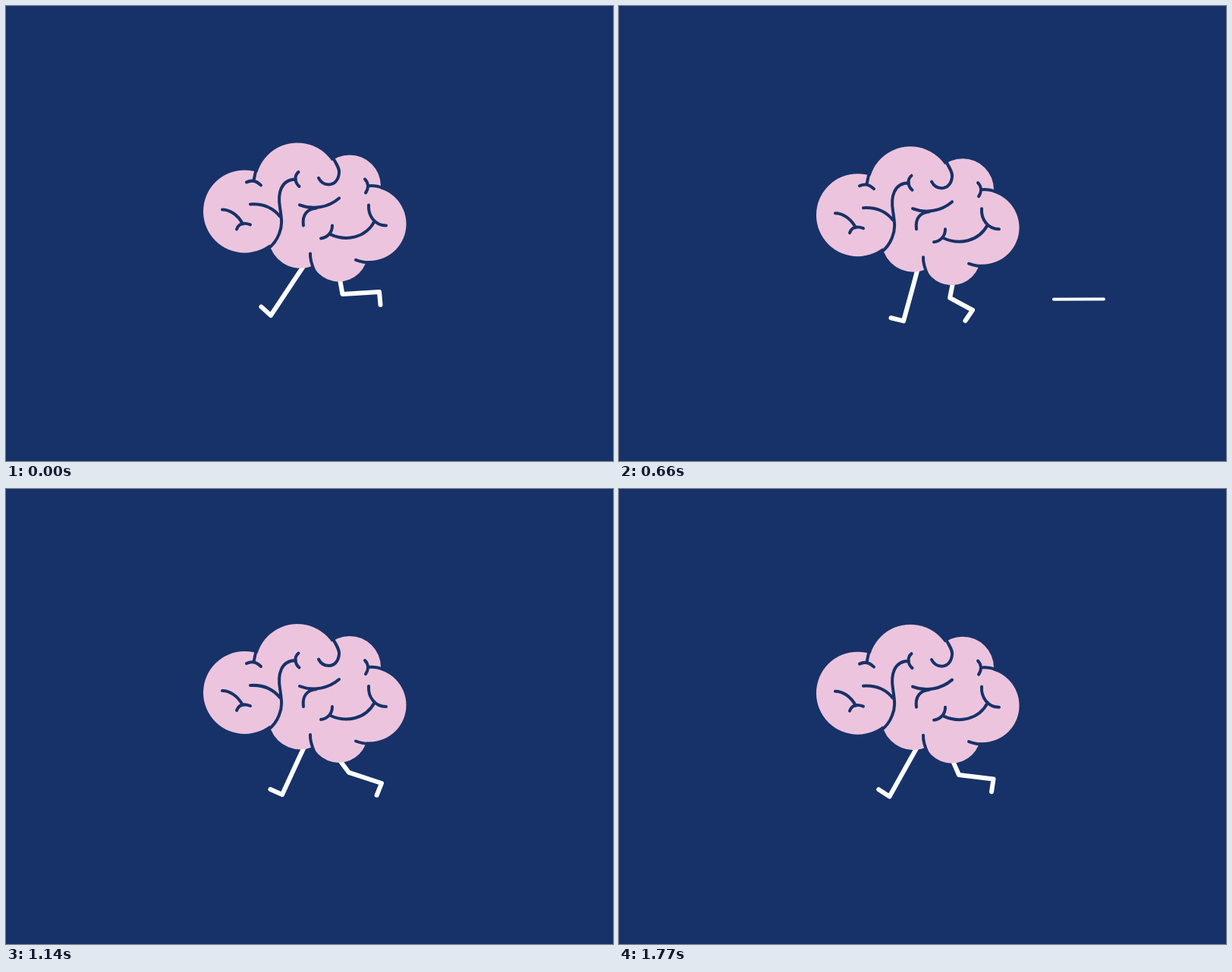
These frames come from a looping animation (800x600 px, 1800 ms). An HTML page with a canvas:

```html
<!DOCTYPE html>
<html lang="en">
<head>
<meta charset="utf-8">
<title>Running brain</title>
<style>
html, body { margin: 0; width: 100%; height: 100%; overflow: hidden; background: #173268; }
canvas { display: block; width: 800px; height: 600px; }
</style>
</head>
<body>
<canvas id="stage" width="800" height="600"></canvas>
<script>
const ctx = document.getElementById('stage').getContext('2d');
const NAVY = '#173268', PINK = '#ecc4de', WHITE = '#fff';
const STEP = 30, STEPS = 60, STRIDE = 20;
const THIGH = 20, FOOT = 17;

// One stride: time of each key pose and the pitch of the foot (toe down is positive)
const GAIT = {
  strike: { at: 0, pitch: -42 },
  plant: { at: 3, pitch: 0 },
  lift: { at: 8, pitch: 68 },
  trail: { at: 10, pitch: 95 },
  pull: { at: 13, pitch: 36 },
  reach: { at: 18, pitch: -24 }
};
const POSES = Object.keys(GAIT);

// Per pose: thigh angle from straight down, ankle position
const FRONT = {
  hip: { x: 394, y: 338 }, shift: 0,
  strike: [-34, 349, 408],
  plant: [-5, 388, 419],
  lift: [23, 436, 379],
  trail: [4, 434, 367],
  pull: [-32, 405, 395],
  reach: [-25, 364, 403]
};
const BACK = {
  hip: { x: 440, y: 358 }, shift: STRIDE / 2,
  strike: [-44, 387, 415],
  plant: [-8, 430, 434],
  lift: [37, 495, 388],
  trail: [10, 492, 377],
  pull: [-22, 453, 413],
  reach: [-45, 406, 413]
};

const body = new Path2D('M350 255 L480 255 L455 325 L385 325 Z');
function addLobe(x, y, r) {
  const lobe = new Path2D();
  lobe.arc(x, y, r, 0, Math.PI * 2);
  body.addPath(lobe);
}
addLobe(314.5, 271.5, 54.5);
addLobe(384, 236, 55);
addLobe(453, 238, 41);
addLobe(479, 288, 48.5);
addLobe(438.5, 326, 38);
addLobe(388, 304.5, 42);

const folds = new Path2D([
  'M331 212 Q328 222 326.5 231',
  'M317 233 Q327 228 336 237',
  'M285 269 C294 269 305 275 312 288',
  'M304 295 C307 287 314 286 322 289',
  'M322 262 C338 261 352 267 361 278',
  'M382 229 C362 229 358 248 361 266 C363 280 365 289 360 301 C357 309 353 315 345 321',
  'M385.5 219.5 C380 224 380 233 386.5 238.5',
  'M429 198 C434 206 440 215 439 221 C438 231 432 236 425.5 236 C419 236 414.5 232.5 412 227.5',
  'M387 263 C405 270 425 266 439 254',
  'M409 267 C397 268 390 276 392 290',
  'M415 307 C424 306 430 299 430 290',
  'M428 302 C448 311 474 307 486 284',
  'M478 263 C477 277 486 290 501 290',
  'M473 229 C478 234 478 241 474 247',
  'M477 238 C484 237 490 238 498 241',
  'M401 327 C400.5 335 403 342 407 351',
  'M461 335.5 Q470 339 480 339'
].join(' '));

const lerp = (a, b, u) => a + (b - a) * u;

// The body sinks over six steps and springs back over four
function bounce(step) {
  const s = (step + 2) % 10;
  const turn = s < 6 ? s / 6 : (10 - s) / 4;
  return 4.8 * (1 - Math.cos(Math.PI * turn));
}

function polyline(points, width) {
  ctx.lineWidth = width;
  ctx.strokeStyle = WHITE;
  ctx.beginPath();
  for (const [x, y] of points) ctx.lineTo(x, y);
  ctx.stroke();
}

function drawLeg(leg, step, drop) {
  const s = (step + leg.shift) % STRIDE;
  const i = POSES.filter(name => GAIT[name].at <= s).length - 1;
  const a = POSES[i], b = POSES[(i + 1) % POSES.length];
  const from = GAIT[a].at, to = GAIT[b].at || STRIDE;
  const u = (s - from) / (to - from);

  const [thigh, ax, ay] = leg[a].map((v, n) => lerp(v, leg[b][n], u));
  const pitch = lerp(GAIT[a].pitch, GAIT[b].pitch, u) * Math.PI / 180;
  const swing = thigh * Math.PI / 180;
  const hx = leg.hip.x, hy = leg.hip.y + drop;
  polyline([
    [hx, hy],
    [hx + THIGH * Math.sin(swing), hy + THIGH * Math.cos(swing)],
    [ax, ay],
    [ax - FOOT * Math.cos(pitch), ay + FOOT * Math.sin(pitch)]
  ], 6);
}

// A dash sweeping right along a fixed track
function drawDash(head, length, y, slope) {
  const left = Math.max(74, head - length);
  const right = Math.min(730, head);
  if (right > left) polyline([left, right].map(x => [x, y + slope * (x - 400)]), 4);
}

function drawBrain(drop) {
  ctx.save();
  ctx.translate(0, drop - 3);
  ctx.fillStyle = PINK;
  ctx.fill(body);
  ctx.strokeStyle = NAVY;
  ctx.lineWidth = 4;
  ctx.stroke(folds);
  ctx.restore();
}

function draw(now) {
  const step = Math.floor(now / STEP) % STEPS;
  const drop = bounce(step);
  ctx.fillStyle = NAVY;
  ctx.fillRect(0, 0, 800, 600);
  ctx.lineCap = ctx.lineJoin = 'round';
  drawDash(269 + 41.1 * (step - 13), 66, 387.5, -0.004);
  drawDash(526 + 42 * (step - 51), 36, 376, -0.03);
  drawLeg(FRONT, step, drop);
  drawLeg(BACK, step, drop);
  drawBrain(drop);
}

const start = performance.now();
function tick() {
  draw(performance.now() - start);
  requestAnimationFrame(tick);
}
tick();
</script>
</body>
</html>
```
